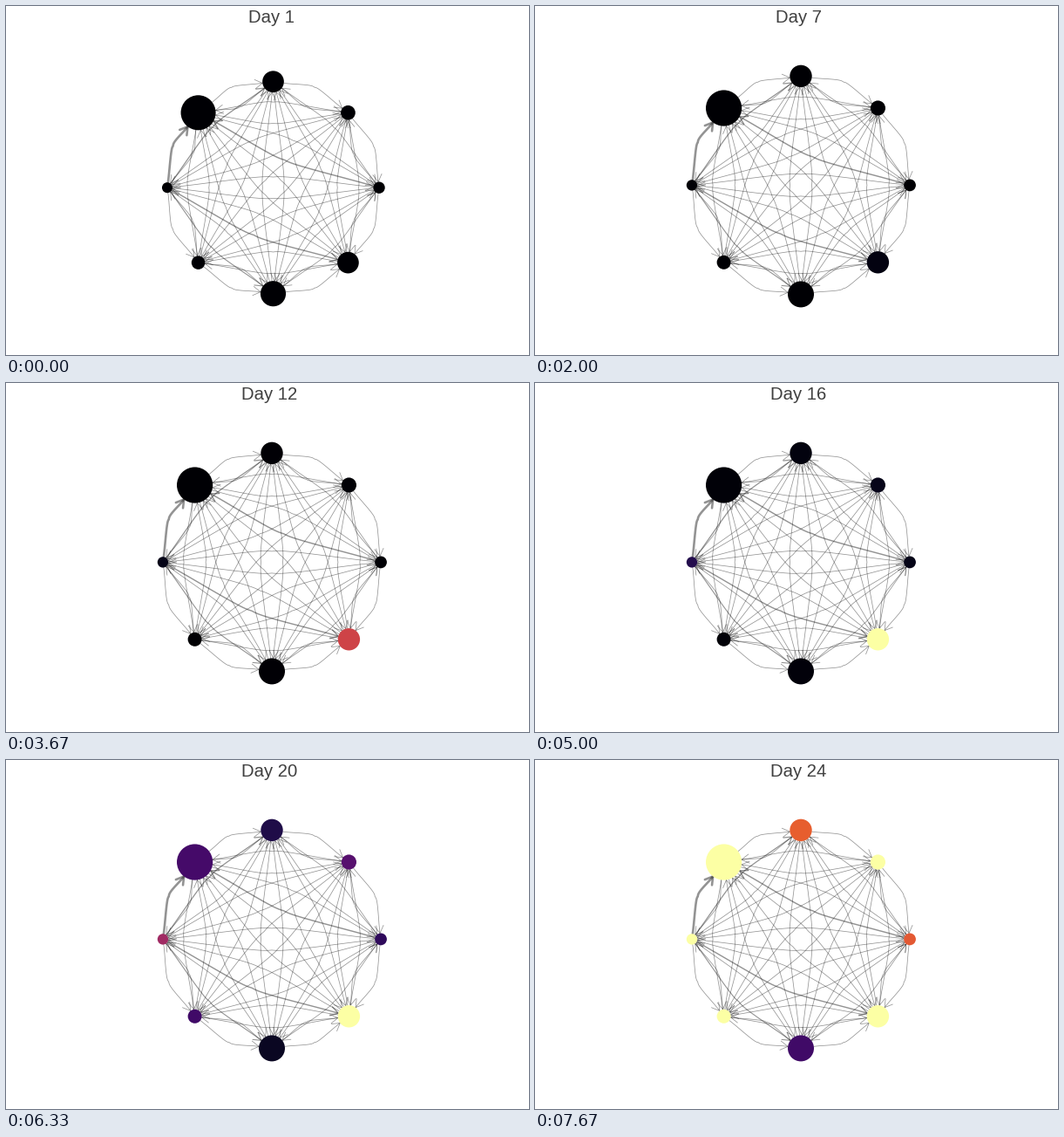
A matplotlib script for the animation above (8 s loop, 600 px wide and 400 px high).

```python
import numpy as np
import matplotlib.pyplot as plt
from matplotlib.animation import FuncAnimation
from matplotlib.collections import LineCollection
from matplotlib.patches import Circle

LOOP_MS, STEP_MS, DAYS = 8000, 40, 24
PX = 0.72  # points per pixel at 100 dpi
FULL_RING = 125

# Clockwise from the left: radius, day of saturation, growth rate per day
NODES = [
    (6.2, 22.8, 0.30), (20.6, 22.4, 0.65), (12.7, 25.1, 0.41), (8.6, 23.2, 0.43),
    (6.9, 25.4, 0.34), (12.7, 13.0, 0.59), (15.0, 29.4, 0.30), (8.0, 22.4, 0.68),
]
COUNT = len(NODES)
RADII, SATURATED, GROWTH = np.array(NODES).T
EDGES = [(a, b) for a in range(COUNT) for b in range(COUNT) if a != b]
HEAVY = {(0, 1): 2.6, (4, 1): 1.45, (0, 5): 1.4, (0, 2): 1.25, (0, 6): 1.1}
WIDTHS = [HEAVY.get(edge, 0.75) * PX for edge in EDGES]
ANGLES = np.pi - np.arange(COUNT) * 2 * np.pi / COUNT
UNIT = np.column_stack([np.cos(ANGLES), -np.sin(ANGLES)])


def unit(v):
    return v / np.hypot(*v)


def rank(k):
    """Order of the nodes along both sides of the ring, left to lower right."""
    return k if k <= 5 else COUNT - k + 0.5


def g(u, q):
    return u * (q + u * (2 * q + u * (8 - 12 * q + u * (14 * q - 11 + u * (4 - 5 * q)))))


def h(u, q):
    return u * (q + u * (2 * q + u * u * (-2 * q - u * q)))


def half_spline(start, mid, end):
    """First half of an interpolating X-spline through three points."""
    t = np.linspace(0, 1, 40)
    w = np.column_stack([g(1 - t, 0), g(t, 0.5), h(t - 1, 0.5)])
    w /= w.sum(axis=1, keepdims=True)
    return w @ np.array([start, mid, end])


def edge_curve(a, b, points, radii, center, bulge):
    """Curve between two node borders through a midpoint moved sideways."""
    p, q = points[a], points[b]
    dx, dy = unit(q - p)
    normal = np.array([dy, -dx])
    mid = (p + q) / 2
    lean = normal @ (mid - center)
    outward = 1 if rank(a) < rank(b) else -1
    side = np.sign(lean) * outward if abs(lean) > 1e-6 else 1
    mid = mid + side * bulge * normal
    start = p + radii[a] * unit(mid - p)
    end = q + radii[b] * unit(mid - q)
    return np.vstack([half_spline(start, mid, end),
                      half_spline(end, mid, start)[-2::-1]])


def arrow_head(curve, size=10, spread=np.radians(31)):
    tip = curve[-1]
    dx, dy = curve[-4] - tip
    wings = np.arctan2(dy, dx) + np.array([-spread, spread])
    left, right = tip + size * np.column_stack([np.cos(wings), np.sin(wings)])
    return np.array([left, tip, right])


def build_layout(center, ring):
    center = np.array(center)
    points, radii = center + ring * UNIT, RADII * ring / FULL_RING
    curves = [edge_curve(a, b, points, radii, center, 0.1 * ring) for a, b in EDGES]
    return center, points, radii, curves + [arrow_head(c) for c in curves]


OPENING = build_layout((306.5, 208.2), 121.5)
SETTLED = build_layout((305, 205.4), FULL_RING)

fig = plt.figure(figsize=(6, 4), dpi=100, facecolor="white")
ax = fig.add_axes([0, 0, 1, 1])
ax.set_xlim(0, 600)
ax.set_ylim(400, 0)
ax.axis("off")

lines = LineCollection([], linewidths=WIDTHS * 2, colors=[(0.1, 0.1, 0.1, 0.47)],
                       capstyle="round", joinstyle="round", zorder=1)
ax.add_collection(lines, autolim=False)
dots = [ax.add_patch(Circle((0, 0), 1, lw=0, zorder=2)) for _ in NODES]
title = ax.text(0, 18.7, "", family="Liberation Sans", size=20.3 * PX,
                color="#404040", ha="center", va="baseline")


def update(frame):
    # The lead makes each day begin on the step just before its exact time.
    lead = 0.75 * STEP_MS
    day = 1 + int((frame * STEP_MS + lead) * DAYS / LOOP_MS)
    center, points, radii, segments = OPENING if day == 1 else SETTLED
    shares = np.minimum(1, np.exp(GROWTH * (day - SATURATED)))
    lines.set_segments(segments)
    for dot, point, radius, color in zip(dots, points, radii, plt.cm.inferno(shares)):
        dot.set_center(point)
        dot.set_radius(radius)
        dot.set_facecolor(color)
    title.set_text(f"Day {day}")
    title.set_x(center[0] - 2.4)
    return [lines, title, *dots]


anim = FuncAnimation(fig, update, frames=LOOP_MS // STEP_MS, interval=STEP_MS,
                     repeat=True, repeat_delay=0, blit=False)
plt.show()
```
